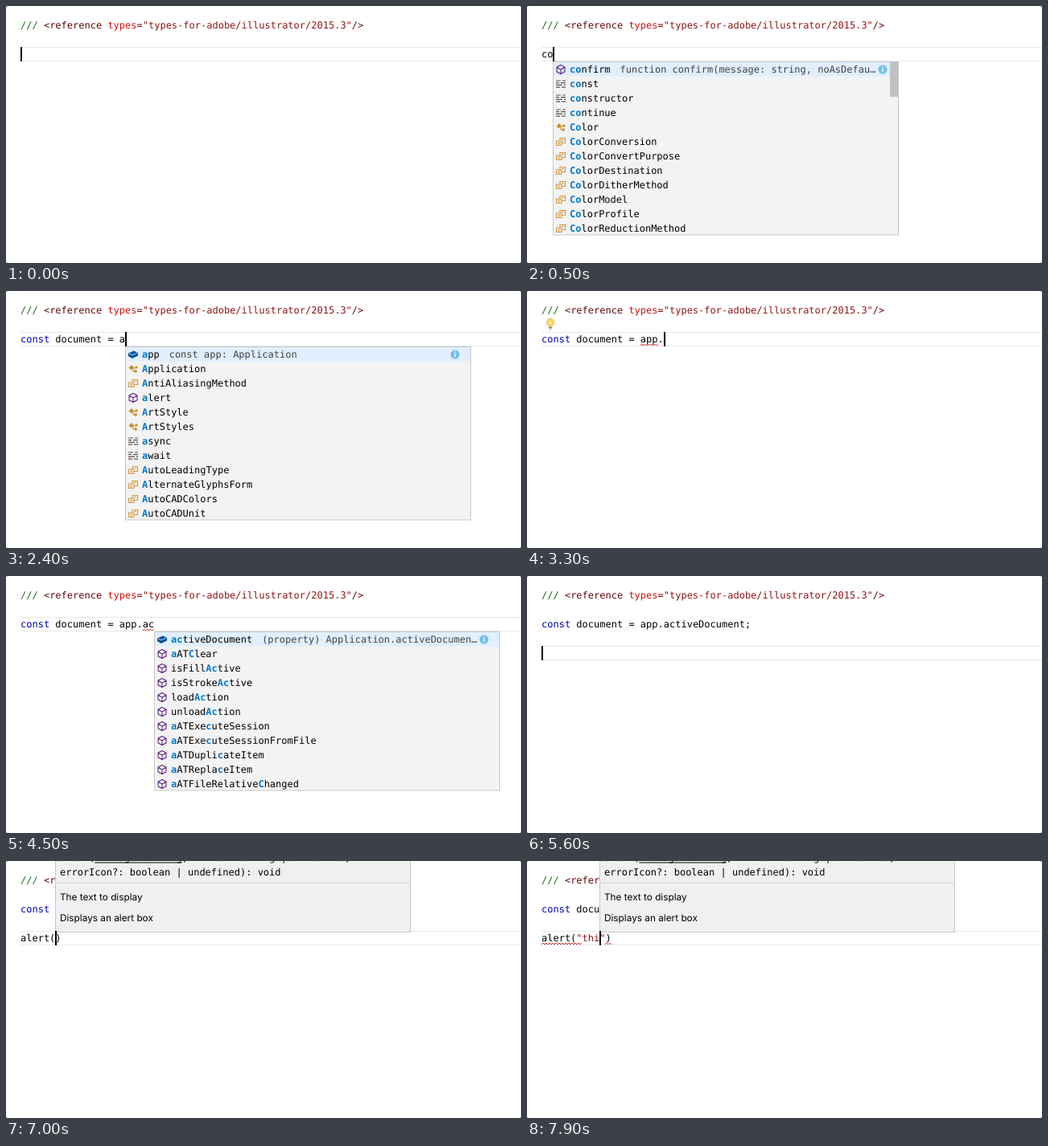
These frames come from a looping animation (640 by 320 pixels, 8000 ms). An HTML page:

```html
<!DOCTYPE html>
<html lang="en">
<head>
<meta charset="utf-8">
<title>Code completion</title>
<style>
  html, body { margin: 0; width: 100%; height: 100%; overflow: hidden; background: #fff; }
  svg { display: block; width: 640px; height: 320px; }
  text { font: 12px "DejaVu Sans Mono", monospace; white-space: pre; text-rendering: geometricPrecision; }
  .prose { font: 11.8px Inter, sans-serif; }
  .hit { font-weight: bold; fill: #007acc; }
</style>
</head>
<body>
<svg id="stage" viewBox="0 0 640 320"></svg>
<script>
const LOOP = 8000, CHAR = 7.224, LEFT = 18, ROW = 18, BLINK = 500;
const stage = document.getElementById('stage');

// Each entry starts with a letter for its icon.
const entries = text => text.split(' ').map(s => ({ kind: s[0], name: s.slice(2) }));
const GLOBALS = entries('f:confirm k:const k:constructor k:continue c:Color e:ColorConversion e:ColorConvertPurpose ' +
  'e:ColorDestination e:ColorDitherMethod e:ColorModel e:ColorProfile e:ColorReductionMethod e:CoordinateSystem');
const WORDS = entries('t:document t:activeDocument k:do');
const VALUES = entries('v:app c:Application e:AntiAliasingMethod f:alert c:ArtStyle c:ArtStyles k:async k:await ' +
  'e:AutoLeadingType e:AlternateGlyphsForm e:AutoCADColors e:AutoCADUnit');
const MEMBERS = entries('v:activeDocument f:aATClear f:isFillActive f:isStrokeActive f:loadAction f:unloadAction ' +
  'f:aATExecuteSession f:aATExecuteSessionFromFile f:aATDuplicateItem f:aATReplaceItem f:aATFileRelativeChanged f:quit');
const ALERTS = entries('f:alert e:AlternateGlyphsForm e:AutoLeadingType e:PDFChangesAllowedEnum e:PDFPrintAllowedEnum ' +
  'c:ArtStyle c:ArtStyles e:StyleRunAlignmentType e:TabStopAlignment e:AntiAliasingMethod ' +
  'e:AutoCADExportFileFormat e:AutoCADGlobalScaleOption');
const DETAILS = {
  confirm: 'function confirm(message: string, noAsDefault?: boolean, title?: string): boolean',
  alert: 'function alert(message: string, title?: string, errorIcon?: boolean): void',
  activeDocument: '(property) Application.activeDocument: Document',
  app: 'const app: Application'
};

const DECL = 'const document = app.activeDocument;';
const CALL = DECL + '\n\nalert(';
// [time, text before the caret, options]; marks are column ranges on the caret's line.
const STEPS = [
  [0, ''],
  [300, 'c'],
  [400, 'c', { list: GLOBALS, scroll: true }],
  [500, 'co', { list: GLOBALS, scroll: true }],
  [700, 'con', { list: GLOBALS }],
  [800, 'cons', { list: GLOBALS }],
  [900, 'const', { list: GLOBALS }],
  [1100, 'const '],
  [1200, 'const d', { list: WORDS, marks: [[0, 5]] }],
  [1300, 'const do', { list: WORDS, marks: [[0, 5]] }],
  [1400, 'const doc', { list: WORDS, marks: [[0, 5]] }],
  [1700, 'const document'],
  [1800, 'const document '],
  [1900, 'const document ='],
  [2000, 'const document = '],
  [2200, 'const document = a'],
  [2300, 'const document = a', { list: VALUES }],
  [2500, 'const document = ap', { list: VALUES }],
  [2700, 'const document = app', { list: VALUES }],
  [3100, 'const document = app.', { marks: [[17, 20]] }],
  [3200, 'const document = app.', { marks: [[17, 20]], bulb: true }],
  [3500, 'const document = app.', { list: MEMBERS }],
  [3800, 'const document = app.a', { list: MEMBERS }],
  [4000, 'const document = app.ac', { list: MEMBERS }],
  [4200, 'const document = app.ac', { list: MEMBERS, marks: [[21, 23]] }],
  [4600, DECL.slice(0, -1)],
  [4800, DECL],
  [5300, DECL + '\n'],
  [5500, DECL + '\n\n'],
  [5900, DECL + '\n\na'],
  [6000, DECL + '\n\na', { list: ALERTS }],
  [6100, DECL + '\n\nal', { list: ALERTS }],
  [6300, DECL + '\n\nale', { list: ALERTS }],
  [6500, DECL + '\n\naler', { list: ALERTS }],
  [6600, DECL + '\n\nalert', { list: ALERTS }],
  [6800, CALL, { after: ')' }],
  [7000, CALL, { after: ')', hint: true }],
  [7300, CALL + '"', { after: '")', hint: true }],
  [7500, CALL + '"', { after: '")', hint: true, marks: [[0, 9]] }],
  [7700, CALL + '"t', { after: '")', hint: true, marks: [[0, 7], [8, 10]] }],
  [7800, CALL + '"th', { after: '")', hint: true, marks: [[0, 7], [9, 11]] }],
  [7900, CALL + '"thi', { after: '")', hint: true, marks: [[0, 7], [10.9, 12]] }]
];

const esc = s => s.replace(/&/g, '&amp;').replace(/</g, '&lt;');
const text = (x, y, s, attrs = '') => `<text x="${x}" y="${y}" ${attrs}>${s}</text>`;
const rect = (x, y, w, h, attrs) => `<rect x="${x}" y="${y}" width="${w}" height="${h}" ${attrs}/>`;
const path = (d, attrs) => `<path d="${d}" ${attrs}/>`;
const span = (s, color) => `<tspan fill="${color}">${esc(s)}</tspan>`;
const column = n => LEFT + n * CHAR;

// Ranges of name hit by the query; the first must begin a word.
function match(name, query, from = 0) {
  if (!query) return [];
  for (let k = query.length; k > 0; k--) {
    const hits = [];
    for (let i = from; i <= name.length - k; i++)
      if (name.slice(i, i + k).toLowerCase() === query.slice(0, k)) hits.push(i);
    const at = hits.find(i => i === 0 || /[A-Z]/.test(name[i])) ?? (from ? hits[0] : undefined);
    if (at === undefined) continue;
    const rest = match(name, query.slice(k), at + k);
    if (rest) return [[at, k], ...rest];
  }
  return null;
}

function emphasize(name, ranges) {
  let out = '', end = 0;
  for (const [at, k] of ranges) {
    out += name.slice(end, at) + `<tspan class="hit">${name.slice(at, at + k)}</tspan>`;
    end = at + k;
  }
  return out + name.slice(end);
}

const line = (color, width = 1.1) => `fill="none" stroke="${color}" stroke-width="${width}"`;
const ICONS = {
  f: path('M0-5.5 5-2.8V2.8L0 5.5-5 2.8V-2.8ZM-5-2.8 0 0 5-2.8M0 0V5.5', line('#652d90')),
  k: path('M-6-4H0M2-4H6M-6-1.3H-2M0-1.3H6M-6 1.4H2M4 1.4H6M-6 4.1H-1M1 4.1H6', line('#555', 1.2)),
  c: path('M-5.5-1.5-2-5 1-2-2.5 1.5ZM2-2 4-4 6-2 4 0ZM1 3 3.2.8 5.4 3 3.2 5.2Z', 'fill="#c8902c"') +
     path('M-1-1H3M0-1V3H3', line('#c8902c')),
  e: path('M-1-1V-4.5H5.5V1.5H1M1-2.5H4M-5.5-1H1V4.5H-5.5ZM-3.7 1H-.8M-3.7 2.7H-.8', line('#cf9a3d')),
  t: rect(-6, -4.5, 12, 9, line('#666')) + text(0, 2.5, 'abc', 'style="font-size:6px" text-anchor="middle" fill="#444"'),
  v: path('M-6-1.5 1-4.5 6-2V1.5L-1 5-6 2.2Z', 'fill="#00539c"') + path('M-5-1.2-1 .8 5-1.8', line('#cfe4f7', .9))
};

function squiggle(from, to, baseline) {
  const x0 = column(from), x1 = column(to);
  let d = `M${x0} ${baseline + 4}`;
  for (let x = x0, up = true; x + 2 <= x1 + .5; x += 2, up = !up) d += `l2 ${up ? -2 : 2}`;
  return path(d, line('#d02c2c', 1));
}

function codeLine(source, baseline) {
  const tokens = source.match(/const\b|"[^"]*"?|[^"c]+|c/g) || [];
  const color = s => s === 'const' ? '#0000b4' : s[0] === '"' ? '#8f1515' : '#000';
  return text(LEFT, baseline, tokens.map(s => span(s, color(s))).join(''));
}

function suggestions(x, top, query, { list, scroll }) {
  const left = Math.round(x) + .5;
  const rows = list.map(e => ({ ...e, hits: match(e.name, query) })).filter(e => e.hits).slice(0, 12);
  let out = rect(left, top, 429, rows.length * ROW - .5, 'fill="#f3f3f3" stroke="#c8c8c8"') +
    rect(left + .5, top + .5, 428, ROW - .5, 'fill="#e0eefe"');
  rows.forEach(({ kind, name, hits }, i) => {
    const y = top + 13.5 + i * ROW;
    out += `<g transform="translate(${left + 9.5} ${y - 4})">${ICONS[kind]}</g>` + text(left + 20.5, y, emphasize(name, hits));
  });
  const detail = DETAILS[rows[0].name];
  if (detail) {
    const offset = 32.5 + rows[0].name.length * CHAR;
    const room = Math.floor((404 - offset) / CHAR);
    const shown = detail.length > room ? detail.slice(0, room - 1) + '…' : detail;
    out += text(left + offset, top + 13.5, esc(shown), 'fill="#444"') +
      `<circle cx="${left + 409.5}" cy="${top + 9.5}" r="5.5" fill="#75beea"/>` +
      path(`M${left + 409.5} ${top + 6}v1.6m0 1v4`, line('#fff', 1.5));
  }
  if (scroll) out += rect(left + 418.5, top + .5, 10, 43, 'fill="#c1c1c1"');
  return out;
}

function signature(x) {
  const left = Math.round(x) + .5, tx = left + 5.5;
  return rect(left, -40.5, 441, 129, 'fill="#f0f0f2" stroke="#c8c8c8"') +
    text(tx, 0, 'alert(message: string, title?: string | undefined,') +
    path(`M${tx + 6 * CHAR} 2h${15 * CHAR}`, line('#000', 1.2)) +
    text(tx, 18, 'errorIcon?: boolean | undefined): void') +
    path(`M${left} 27.5h441`, line('#d2d2d4', 1)) +
    text(tx, 49, 'The text to display', 'class="prose"') +
    text(tx, 75, 'Displays an alert box', 'class="prose"');
}

const BULB = path('M26.5 44C26 42 24.5 41.5 24.5 38.8A4.5 4.5 0 0 1 33.500 38.800C33.500 41.500 32 42 31.500 44Z',
    'fill="#fdd365" stroke="#e3b341" stroke-width=".8"') +
  path('M27.500 41V39L29 40 30.500 39V41', line('#fff', .8)) + path('M26.8 45.300H31.200M27.500 47H30.500', line('#777', 1.2));

const HEADER = text(LEFT, 28, span('/// ', '#1c6b1c') + span('<reference ', '#600808') + span('types', '#d01010') +
  span('=', '#600808') + span('"types-for-adobe/illustrator/2015.3"', '#8f1515') + span('/>', '#600808'));

function draw([, before, options = {}], caretOn) {
  const lines = before.split('\n'), row = lines.length - 1, current = lines[row];
  const top = 51 + row * ROW, x = column(current.length);
  let out = rect(0, 0, 640, 320, 'fill="#777"') + rect(0, 0, 640, 320, 'rx="2.5" fill="#fff"');
  out += path(`M${LEFT} ${top + .5}H640M${LEFT} ${top + 17.5}H640`, line('#e8e8e8', 1)) + HEADER;
  lines.forEach((s, i) => out += codeLine(i === row ? s + (options.after || '') : s, 64 + i * ROW));
  for (const [from, to] of options.marks || []) out += squiggle(from, to, top + 13);
  if (options.bulb) out += BULB;
  if (options.list) out += suggestions(x, top + 18.5, current.match(/\w*$/)[0], options);
  if (options.hint) out += signature(x);
  if (caretOn) out += rect(Math.round(x), top, 2, ROW, 'fill="#000"');
  stage.innerHTML = out;
}

const start = performance.now();
let shown = '';
function frame() {
  const t = (performance.now() - start) % LOOP;
  const index = STEPS.findLastIndex(step => step[0] <= t);
  let typed = index;
  while (typed > 0 && STEPS[typed - 1][1] === STEPS[index][1]) typed--;
  const caretOn = Math.floor((t - STEPS[typed][0]) / BLINK) % 2 === 0;
  const key = index + ':' + caretOn;
  if (key !== shown) draw(STEPS[index], caretOn);
  shown = key;
  requestAnimationFrame(frame);
}
frame();
</script>
</body>
</html>
```
